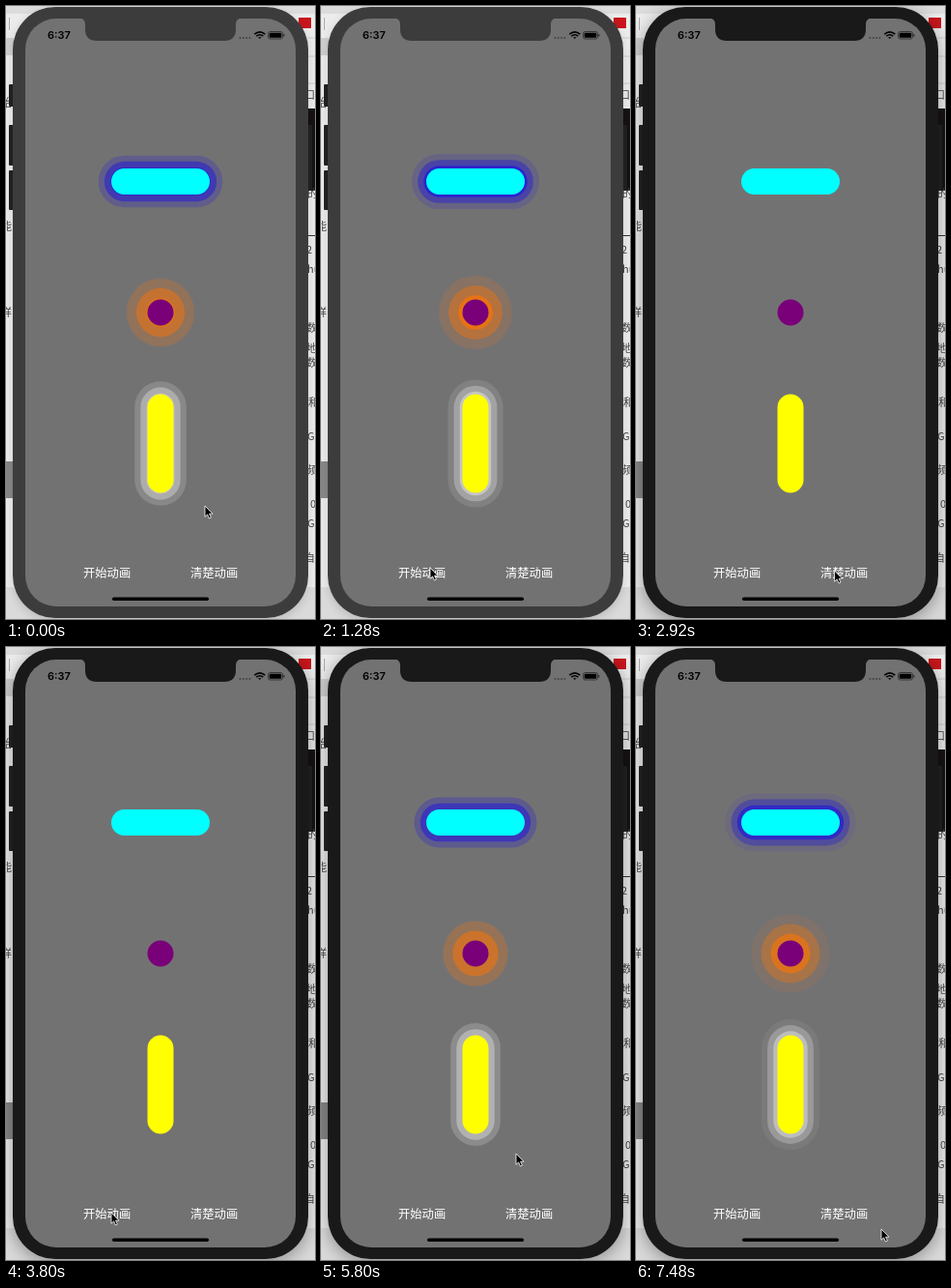
Write an HTML page that moves like this. It is 320 by 634 pixels and loops after 7.52 s.

```html
<!DOCTYPE html>
<html lang="zh">
<meta charset="utf-8">
<style>
html, body { margin: 0; width: 100%; height: 100%; overflow: hidden; background: #e9e9e9; }
svg { display: block; }
text { font-family: "Noto Sans CJK SC", "Noto Sans CJK", Inter, sans-serif; }
#phone { fill: #3c3c3c; filter: drop-shadow(0 3px 5px rgba(0,0,0,.15)); }
.active #phone { fill: #191919; filter: drop-shadow(0 4px 9px rgba(0,0,0,.35)); }
</style>
<svg id="stage" width="320" height="634" viewBox="0 0 320 634">
  <!-- page behind the phone -->
  <rect width="320" height="634" fill="#ececec"/>
  <rect width="320" height="8" fill="#dcdcdc"/>
  <rect y="33" width="8" height="18" fill="#cfcfcf"/>
  <rect y="471" width="8" height="38" fill="#888"/>
  <path d="M0 601H320V634H0Z" fill="#dadada"/>
  <path d="M3.5 12V25" stroke="#aaa"/>
  <rect x="303" y="12" width="13" height="11" fill="#c8161c"/>
  <path d="M308 33H320M308 52H320M308 80H320" stroke="#ccc"/>
  <rect x="312" y="106" width="8" height="85" fill="#161214"/>
  <path d="M312 237.500H320" stroke="#333"/>
  <g id="words" font-size="11" fill="#444"></g>
  <!-- phone -->
  <g fill="#222"><rect x="3" y="81" width="6" height="23" rx="1"/><rect x="3" y="123" width="6" height="42" rx="1"/><rect x="3" y="170" width="6" height="41" rx="1"/><rect x="311" y="123" width="6" height="68" rx="1"/></g>
  <g id="phone">
    <rect x="7" y="1" width="306" height="632" rx="44"/>
    <rect x="20" y="13" width="280" height="608" rx="32" fill="#737273"/>
    <path d="M76 12.500Q82 13 82 19V24Q82 36 94 36H226Q238 36 238 24V19Q238 13 244 12.500Z"/>
  </g>
  <text x="43" y="34.300" font-size="11" font-weight="600" style="font-family:Inter,sans-serif">6:37</text>
  <g fill="#444"><circle cx="242.500" cy="33" r="1"/><circle cx="245.800" cy="33" r="1"/><circle cx="249.100" cy="33" r="1"/><circle cx="252.400" cy="33" r="1"/></g>
  <g fill="none" stroke="#000" stroke-width="1.600"><path d="M257.300 29.200Q262.800 24.400 268.300 29.200M259.300 31.200Q262.800 28.300 266.300 31.200"/><path d="M261 32.200h3.600l-1.800 1.900z" fill="#000" stroke="none"/></g>
  <rect x="271.500" y="26.500" width="15" height="7.500" rx="2" fill="none" stroke="#222" stroke-width=".7"/>
  <rect x="272.700" y="27.700" width="12.600" height="5.100" rx="1"/>
  <path d="M287.900 29v2.600" stroke="#222"/>
  <g id="pulses"></g>
  <g font-size="12.300" fill="#fff"><text x="80" y="591">开始动画</text><text x="191" y="591">清楚动画</text></g>
  <rect x="110" y="611.500" width="100" height="3.500" rx="1.750"/>
  <path id="cursor" d="M0 0V11.300L2.600 8.900 4.400 13 6.400 12.100 4.600 8.200H8Z" stroke="#fff" stroke-width=".8"/>
</svg>
<script>
const LOOP = 7520, FOCUS = 2680, CLEAR = 2760, START = 3800;
const $ = id => document.getElementById(id);

function add(parent, tag, attrs) {
  const el = document.createElementNS('http://www.w3.org/2000/svg', tag);
  for (const k in attrs) el.setAttribute(k, attrs[k]);
  return parent.appendChild(el);
}

const words = [
  [-7, 20, 'v'], [-5, 104, '始'], [-5, 232, '能'], [-5, 321, '样'],
  [309, 96, '口'], [312, 198, '的'], [311, 256, '2'], [312, 276, 'hu'],
  [311, 337, '数'], [311, 358, '地'], [311, 373, '数'], [313, 414, '和'],
  [312, 449, 'G'], [311, 484, '频'], [315, 519, '0'], [312, 539, 'G'], [309, 575, '自1']
];
for (const [x, y, s] of words) add($('words'), 'text', { x, y }).textContent = s;

// Half sizes, colours and ring growth in pixels per second
const shapes = [
  { cy: 181.5, w: 51, h: 13.5, fill: '#0ff', glow: 'rgb(28,18,222)', grow: 6.2 },
  { cy: 317, w: 13.5, h: 13.5, fill: '#790079', glow: 'rgb(255,116,0)', grow: 10.1 },
  { cy: 452.5, w: 13.5, h: 51, fill: '#ff0', glow: 'rgb(215,215,215)', grow: 6.2 }
];

function setBox(el, s, pad) {
  const w = s.w + pad, h = s.h + pad;
  const box = { x: 160 - w, y: s.cy - h, width: 2 * w, height: 2 * h, rx: 13.5 + pad };
  for (const k in box) el.setAttribute(k, box[k]);
}

for (const s of shapes) {
  s.rings = [0, 1, 2].map(() => add($('pulses'), 'rect', { fill: s.glow }));
  setBox(add($('pulses'), 'rect', { fill: s.fill }), s, 0);
}

// Pointer stops: time, x, y
const stops = [
  [0, 206, 517], [480, 206, 517], [800, 188, 544], [1280, 113, 581], [1450, 111, 585],
  [1800, 111, 585], [2350, 206, 586], [2520, 206, 584], [2900, 206, 584], [3450, 109, 585],
  [5000, 109, 585], [5560, 202, 524], [7200, 202, 524], [7480, 254, 602], [LOOP, 254, 602]
];

function pointer(t) {
  const i = stops.findIndex(s => s[0] > t), a = stops[i - 1], b = stops[i];
  const p = (t - a[0]) / (b[0] - a[0]), e = p * p * (3 - 2 * p);
  return [a[1] + (b[1] - a[1]) * e, a[2] + (b[2] - a[2]) * e];
}

function drawRings(t) {
  const running = t < CLEAR || t >= START;
  const elapsed = (t < CLEAR ? t + 3150 : t - START) / 1000;
  for (const s of shapes) s.rings.forEach((ring, i) => {
    const age = elapsed % 1 + i;
    const alpha = running && age <= elapsed ? .75 * (1 - age / 3) * Math.min(1, age * 4) : 0;
    setBox(ring, s, age * s.grow);
    ring.setAttribute('opacity', alpha);
  });
}

function frame() {
  const t = performance.now() % LOOP;
  $('stage').classList.toggle('active', t >= FOCUS);
  drawRings(t);
  $('cursor').setAttribute('transform', `translate(${pointer(t)})`);
  requestAnimationFrame(frame);
}
frame();
</script>
</html>
```
